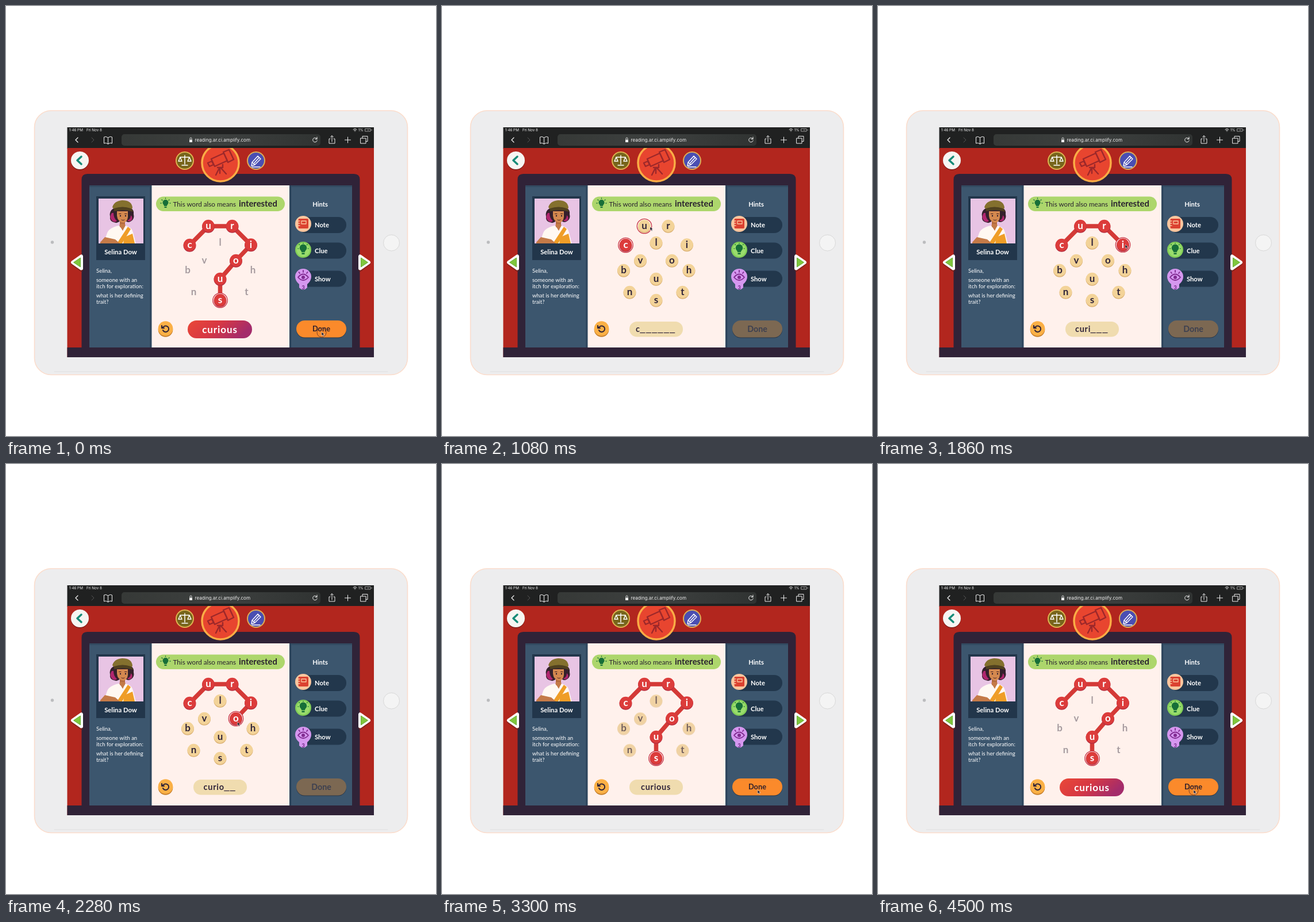
These frames come from a looping animation (748 px wide and 748 px high, 4.56 s). An HTML page:

```html
<!DOCTYPE html>
<html lang="en">
<head>
<meta charset="utf-8">
<style>
html, body { margin: 0; width: 100%; height: 100%; overflow: hidden; background: #fff; }
svg { display: block; width: 748px; height: 748px; }
text { font-family: Lato, sans-serif; }
.ui { font-family: Inter, sans-serif; fill: #eee; }
.mid { text-anchor: middle; font-weight: 700; }
.line { fill: none; stroke-linecap: round; stroke-linejoin: round; }
.white { fill: #fff; }
</style>
</head>
<body>
<svg viewBox="0 0 748 748">
  <defs>
    <linearGradient id="win" x2="1" y2=".3"><stop stop-color="#ea4837"/><stop offset=".5" stop-color="#d73843"/><stop offset="1" stop-color="#a42c6b"/></linearGradient>
    <linearGradient id="field"><stop stop-color="#363937"/><stop offset=".5" stop-color="#3d403f"/><stop offset="1" stop-color="#303332"/></linearGradient>
    <clipPath id="page"><path d="M106.500 247H640V611H106.500Z"/></clipPath>
    <clipPath id="photo"><path d="M161 335H239V413H161Z"/></clipPath>
    <path id="bulb" d="M-5-1a5 5 0 0 1 10 0c0 3-2.600 3.500-2.600 6h-4.800c0-2.500-2.600-3-2.600-6ZM-2 6h4v2h-4Z"/>
    <g id="arrow" stroke-linejoin="round">
      <path d="M-8 2 7-8V13Z" fill="#6b201c" stroke="#6b201c" stroke-width="6" opacity=".6"/>
      <path d="M-8 0 7-10.500V10.500Z" fill="#fff" stroke="#fff" stroke-width="6"/>
      <path d="M-6.500 0 5.500-8V8Z" fill="#7fc63d" stroke="#68ac35"/>
    </g>
  </defs>

  <!-- tablet -->
  <rect x="49.500" y="182" width="649" height="459.500" rx="29" fill="#ededee" stroke="#fbdccb" stroke-width="1.500"/>
  <path class="line" d="M84 636H664" stroke="#dfdfe0"/>
  <circle cx="80.500" cy="411" r="2.700" fill="#bbbcbe"/>
  <circle cx="670.500" cy="412" r="14" fill="#f4f4f4" stroke="#d8d8d8"/>

  <!-- browser -->
  <path d="M106.500 211H640V248H106.500Z" fill="#202121"/>
  <g font-size="6.300">
    <text class="ui" x="110" y="218">1:46 PM</text>
    <text class="ui" x="140" y="218">Fri Nov 8</text>
    <text class="ui" x="613" y="218">1%</text>
  </g>
  <g class="line" stroke="#eee">
    <path d="M604 215q3-3 6 0M605.500 216.500q1.500-1.500 3 0M607 218v.1"/>
    <path d="M625 213.500h9v4.500h-9ZM636 215v1.500M630 215v1.500" stroke-width=".6"/>
    <path d="M125 229l-4 4 4 4" stroke-width="1.300"/>
    <path d="M149 229l4 4-4 4" stroke="#555"/>
    <path d="M177.500 229q-4-3-7-1v11q3-2 7 1q4-3 7-1v-11q-3-2-7 1v11"/>
    <path d="M564 231h-2v8h10v-8h-2M567 236v-10M564.500 228l2.500-2.500 2.500 2.500M589.500 233h10M594.500 228v10M617 230h9v9h-9ZM620 230v-3.500h9v9h-3"/>
  </g>
  <rect x="201" y="223" width="346" height="20" rx="5" fill="url(#field)"/>
  <path class="line" d="M541 231.500a3.800 3.800 0 1 0 .2 2.500M541 228v3.500h-3" stroke="#eee"/>
  <path d="M319 232.500h5v4.500h-5Z" fill="#eee"/>
  <path class="line" d="M320 232v-1.500a1.500 1.500 0 0 1 3 0v1.500" stroke="#eee" stroke-width=".9"/>
  <text class="ui" x="328.500" y="236" font-size="8.150">reading.ar.ci.amplify.com</text>

  <!-- game page -->
  <g clip-path="url(#page)">
    <path d="M106 247H640V611H106Z" fill="#b2261e"/>
    <path d="M106 594H640V611H106Z" fill="#302338"/>
    <path d="M131.500 612V302q0-10 10-10H605q10.500 0 10.500 10V612Z" fill="#302338"/>
    <path d="M145 312H602V594H145Z" fill="#3c566e"/>
    <path d="M145 312H602V315H145Z" fill="#334b62"/>
    <path d="M250 312H253.500V594H250ZM493 312H496.500V594H493Z" fill="#2f475e"/>
    <path d="M253.500 312H493V594H253.500Z" fill="#fff1ec"/>

    <circle cx="128.500" cy="270" r="15.500" fill="#7f1c18"/>
    <circle cx="128.500" cy="268.500" r="15.500" fill="#f7f5f2"/>
    <path class="line" d="M131 262l-7 6.500 7 6.500" stroke="#168b78" stroke-width="3.500"/>

    <circle cx="311" cy="269" r="15" fill="#77651c" stroke="#dfb551" stroke-width="2"/>
    <path class="line" d="M311 260v15M306 277h10M303 263h16M303 263l-3 7h6ZM319 263l-3 7h6Z" stroke="#fff" stroke-width="1.500"/>
    <circle cx="373" cy="273" r="32" fill="#e8452f" stroke="#faac45" stroke-width="3.500"/>
    <path class="line" d="M357 266l22-10 6 13-22 10ZM378 254l10-4 8 17-10 5ZM351 273l7-3 3 6-7 3ZM368 281h9v-5M371 282l-6 12M374 282l9 10M372 282v9" stroke="#9d282a" stroke-width="2.400"/>
    <circle cx="435" cy="269" r="15" fill="#4a4eb2" stroke="#dfae55" stroke-width="2"/>
    <path class="line" d="M428 272l10-11 5 5-10 10-6 2ZM428 272l5 4M431 274l9-10M428 280h14" stroke="#fff" stroke-width="1.400"/>

    <use href="#arrow" x="124" y="446"/>
    <use href="#arrow" transform="translate(623 446) scale(-1 1)"/>

    <!-- profile -->
    <path d="M157 331H242V442H157Z" fill="#22364b"/>
    <g clip-path="url(#photo)">
      <path d="M161 335H239V413H161Z" fill="#e8c4e4"/>
      <path d="M187 352q-8 5-6 14-1 8 6 10 7 3 11-2h10q5 4 10 0 6-4 4-12 1-7-5-11Z" fill="#35202c"/>
      <path d="M184 360q-5 7 0 13 5 5 9 1-6-5-6-14ZM217 364q5 4 1 9-4 3-7 0 6-2 6-9Z" fill="#b0266f"/>
      <path d="M198 372h9v13h-9Z" fill="#b36a3e"/>
      <path d="M169 414l7-19q3-9 20-13l7 7 5-7q11 3 13 12l5 20Z" fill="#fff8f2"/>
      <path d="M197 381l6 10 5-10-3-2h-5Z" fill="#c47a48"/>
      <path d="M193 357h19v10q-1 9-8 10-10-2-11-12Z" fill="#d4894f"/>
      <path d="M212 384l5 4-15 25h-9Z" fill="#ef9d27"/>
      <path d="M164 411l8-9 18 4 8 7h-34Z" fill="#c47a48"/>
      <path d="M206 402l14-6 4 17h-20Z" fill="#ef9d27"/>
      <path d="M185 350q3-11 17-12 17 0 18 13l-3 5q-14-5-27 0Z" fill="#84702e"/>
      <path d="M188 352q15-5 29 0l5 6q-17-5-34-1Z" fill="#50411f"/>
      <g fill="#26182a"><circle cx="199" cy="365" r="1.200"/><circle cx="208" cy="365" r="1.200"/></g>
      <path class="line" d="M196.500 361.500h3.500M206.500 361.500h3.500M201 372q2.500 2 5 0" stroke="#4a2220"/>
    </g>
    <text class="mid white" x="199.500" y="431.500" font-size="11.300">Selina Dow</text>
    <g class="white" font-size="9.500">
      <text x="157" y="464">Selina,</text>
      <text x="157" y="480">someone with an</text>
      <text x="157" y="490.500">itch for exploration:</text>
      <text x="157" y="507">what is her defining</text>
      <text x="157" y="517.500">trait?</text>
    </g>

    <!-- clue banner -->
    <rect x="261" y="331.500" width="224" height="25.500" rx="12.700" fill="#add66c"/>
    <use href="#bulb" x="277.500" y="343" fill="#176f38"/>
    <path class="line" d="M269 343h1M285 343h1M271 337l1 1M284 337l-1 1M277.500 334v1" stroke="#176f38" stroke-width="1.300"/>
    <text x="290.500" y="348.500" font-size="11.700" fill="#29212f">This word also means</text>
    <text x="405" y="348.500" font-size="14.800" font-weight="700" fill="#29212f">interested</text>

    <!-- hints -->
    <text class="mid white" x="546.500" y="349" font-size="11.200">Hints</text>
    <g id="hints"></g>
    <circle cx="517" cy="379" r="14" fill="#fac69e"/>
    <rect x="508.500" y="370" width="17.500" height="17" rx="2" fill="#db4130"/>
    <path class="line" d="M514 374h8v5h-8ZM508 374h3M508 378h3M508 382h3" stroke="#fac69e" stroke-width="1.300"/>
    <circle cx="517" cy="424" r="14" fill="#83cf58"/>
    <circle cx="517" cy="424" r="11.500" fill="#9add6c"/>
    <use href="#bulb" transform="translate(517 422) scale(1.250)" fill="#176f38"/>
    <path class="line" d="M508 422h.5M526 422h-.5M510 415l.5.5M524 415l-.5.5M517 412.500v.5" stroke="#176f38" stroke-width="1.400"/>
    <path d="M503 471a14 14 0 1 1 28 0q0 7-7 13v6q-7 7-14 0v-6q-7-6-7-13Z" fill="#d597ef"/>
    <path class="line" d="M508 472q9-11 18 0q-9 10-18 0ZM511 465l-1.500-2M517 463v-3M523 465l1.500-2" stroke="#812b91" stroke-width="1.800"/>
    <circle cx="517" cy="472" r="3" fill="#812b91"/>
    <text class="mid" x="517" y="492.500" font-size="9" fill="#692080">3</text>

    <!-- board -->
    <g id="links" stroke="#d43a37" stroke-width="7.500" class="line"></g>
    <g id="tiles"></g>
    <circle cx="277.500" cy="563" r="12.800" fill="#c7802d"/>
    <circle cx="277.500" cy="561" r="12.800" fill="#fbb046"/>
    <path class="line" d="M273 564a5.300 5.300 0 1 0 1-6l-3 2M271 556v4.200h4" stroke="#302338" stroke-width="2"/>
    <rect id="slot" x="326" y="549" width="93" height="26.500" rx="13" fill="#f0dcaf"/>
    <rect id="prize" x="316" y="547" width="112" height="31" rx="15.500" fill="url(#win)"/>
    <text id="word" class="mid" x="372"></text>
    <rect x="505" y="548.500" width="87" height="29" rx="14.500" fill="#293646"/>
    <rect id="done" x="505" y="547" width="87" height="29.500" rx="14.700"/>
    <text id="doneText" class="mid" x="548.500">Done</text>
    <circle id="press" cx="549" cy="568" r="8" fill="none" stroke="#5d3527"/>
    <path id="cursor" d="M0 0v6.500l1.600-1.500 1.200 2.600 1.200-.5-1.100-2.600h2.300Z" fill="#1f1826" stroke="#fff" stroke-width=".5"/>
  </g>
</svg>
<script>
const LOOP = 4560, STEP = 60, RESET = 60, PRESS = 3480;
const INK = '#30243a';
// letter, x, y, time of selection
const path = [
  ['c', 319.5, 416, 840], ['u', 352, 383, 1140], ['r', 393.5, 383, 1500], ['i', 426, 415.5, 1800],
  ['o', 400, 443, 2220], ['u', 372.5, 475, 2640], ['s', 372.5, 512, 2940]
];
const spare = [
  ['l', 372.5, 412], ['v', 345, 443], ['b', 316, 460], ['h', 429.5, 460], ['n', 326.5, 498], ['t', 418.5, 498]
];
// time, x, y
const cursorKeys = [
  [60, 300, 470], [720, 322, 419], [900, 322, 419], [1080, 362, 384], [1200, 358, 386],
  [1500, 397, 386], [1800, 430, 415], [1920, 430, 415], [2220, 404, 447], [2640, 379, 478],
  [2760, 379, 478], [2940, 377, 515], [3000, 377, 515], [3240, 549, 567]
];

const $ = id => document.getElementById(id);
const clamp = v => Math.max(0, Math.min(1, v));
const set = (el, attrs) => { for (const k in attrs) el.setAttribute(k, attrs[k]); };
function add(parent, tag, attrs, text = '') {
  const el = document.createElementNS('http://www.w3.org/2000/svg', tag);
  set(el, attrs);
  el.textContent = text;
  return parent.appendChild(el);
}

[['Note', 381], ['Clue', 425.5], ['Show', 474.5]].forEach(([label, y]) => {
  add($('hints'), 'rect', { x: 508, y: y - 14, width: 84, height: 28, rx: 14, fill: '#22374c' });
  add($('hints'), 'text', { x: 537, y: y + 4, 'font-size': 11.2, 'font-weight': 700, fill: '#fff' }, label);
});

const links = path.slice(1).map(([, x, y], i) =>
  add($('links'), 'path', { d: `M${path[i][1]} ${path[i][2]}L${x} ${y}` }));

const tiles = [...path, ...spare].map(([letter, x, y, at]) => {
  const g = add($('tiles'), 'g', { transform: `translate(${x} ${y})` });
  const ring = add(g, 'circle', { r: 12.7, fill: '#fff', stroke: '#c83243', 'stroke-width': 1.3 });
  const shade = add(g, 'circle', { r: 11, cy: 0.7 });
  const face = add(g, 'circle', { r: 10.7, cy: -0.5 });
  const text = add(g, 'text', { class: 'mid', y: 5, 'font-size': 17 }, letter);
  return { at, ring, shade, face, text };
});

function cursorAt(t) {
  const i = cursorKeys.findIndex(k => k[0] > t);
  if (i < 0) return cursorKeys[cursorKeys.length - 1].slice(1);
  if (!i) return cursorKeys[0].slice(1);
  const [a, b] = [cursorKeys[i - 1], cursorKeys[i]];
  const p = (t - a[0]) / (b[0] - a[0]), e = p * p * (3 - 2 * p);
  return [a[1] + (b[1] - a[1]) * e, a[2] + (b[2] - a[2]) * e];
}

function draw(t) {
  if (t < RESET) t = LOOP;
  const count = path.filter(p => p[3] <= t).length;
  const complete = count === path.length, won = t >= PRESS;
  const dim = clamp((t - 2940) / 180), gone = clamp((t - PRESS) / 180);

  links.forEach((link, i) => set(link, { opacity: +(count > i + 1) }));
  tiles.forEach(({ at, ring, shade, face, text }, i) => {
    const picked = at <= t, extra = i >= path.length;
    const hover = i === 1 && t >= 1020 && t < 1140;
    const opacity = extra ? (1 - dim * 0.5) * (1 - gone) : 1;
    set(ring, { opacity: +((picked && i === count - 1) || hover) });
    set(shade, { fill: picked ? '#b82f40' : '#dcb376', opacity });
    set(face, { fill: picked ? '#dc3c3b' : '#f3d398', opacity });
    set(text, {
      fill: picked ? '#fff' : extra && won ? '#776e77' : INK,
      opacity: extra ? 1 - dim * 0.35 : 1,
      'font-weight': extra && won ? 400 : 700
    });
  });

  const typed = path.slice(0, count).map(p => p[0]).join('');
  $('word').textContent = typed;
  set($('word'), {
    y: won ? 568.5 : 567, fill: won ? '#fff' : INK,
    'font-size': won ? 17 : 14.5, 'letter-spacing': won ? 0.9 : 0.7
  });
  if (!complete) add($('word'), 'tspan', {
    'font-family': 'Liberation Sans, sans-serif', 'font-size': 15, 'letter-spacing': 2,
    stroke: INK, 'stroke-width': 0.6
  }, '_'.repeat(path.length - count));
  set($('slot'), { opacity: +!won });
  set($('prize'), { opacity: +won });
  set($('done'), { fill: complete ? '#fb8a2b' : '#7c6852' });
  set($('doneText'), {
    fill: complete ? '#30202c' : '#3d4050',
    'font-size': complete ? 12.8 : 14.3, y: complete ? 566.3 : 567.3
  });
  set($('press'), { opacity: won ? 0.8 : 0 });
  set($('cursor'), { transform: `translate(${cursorAt(t).join(' ')})` });
}

function tick() {
  draw(Math.floor((performance.now() % LOOP) / STEP) * STEP);
  requestAnimationFrame(tick);
}
tick();
</script>
</body>
</html>
```
